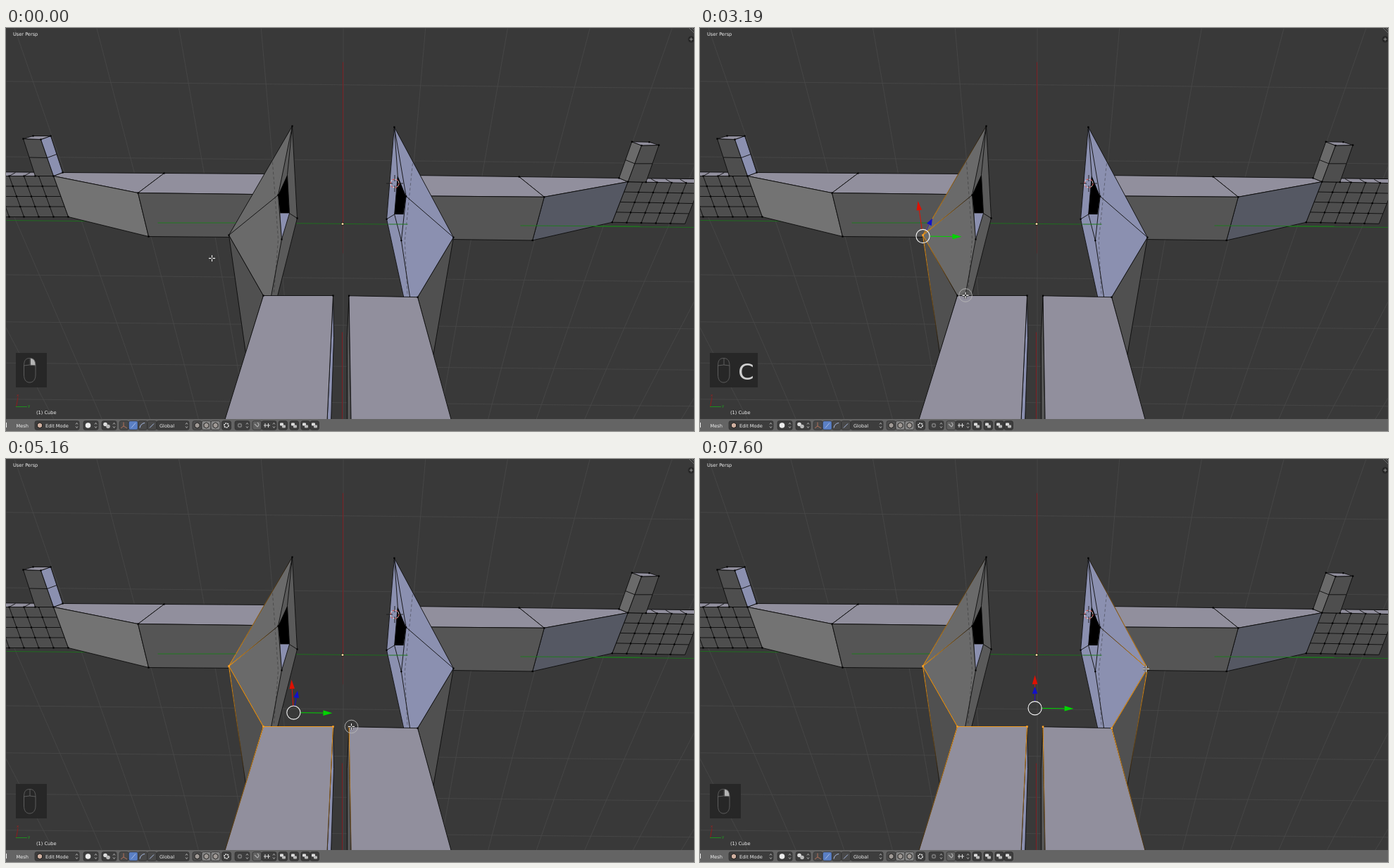
Write an HTML page that moves like this. It is 977 px wide and 573 px high and loops after 8 s.

```html
<!DOCTYPE html>
<html lang="en">
<head>
<meta charset="utf-8">
<title>Mesh editing viewport</title>
<style>
html, body { margin: 0; width: 100%; height: 100%; overflow: hidden; background: #393939; }
svg { display: block; width: 100%; height: 100%; }
text { font-family: "DejaVu Sans", sans-serif; font-size: 6.6px; fill: #f0f0f0; }
</style>
</head>
<body>
<svg id="stage" viewBox="0 0 977 573"></svg>
<script>
const NS = 'http://www.w3.org/2000/svg';
const LOOP = 8000;

function set(el, attrs) {
  for (const k in attrs) el.setAttribute(k, attrs[k]);
}
function add(parent, tag, attrs = {}) {
  const el = document.createElementNS(NS, tag);
  set(el, attrs);
  return parent.appendChild(el);
}
const show = (el, on) => el.setAttribute('visibility', on ? 'visible' : 'hidden');
const path = (parent, d, stroke, width = 1, more = {}) =>
  add(parent, 'path', { d, stroke, 'stroke-width': width, fill: 'none', ...more });
const rect = (parent, x, y, width, height, fill, rx = 0) =>
  add(parent, 'rect', { x, y, width, height, fill, rx });
const ring = (parent, r, stroke, width = 1, more = {}) =>
  add(parent, 'circle', { r, fill: 'none', stroke, 'stroke-width': width, ...more });
const dot = (parent, cx, cy, r, fill) => add(parent, 'circle', { cx, cy, r, fill });
function label(parent, x, y, s, style = '') {
  add(parent, 'text', { x, y, style }).textContent = s;
}
const mix = (a, b, u) => a.map((v, i) => v + (b[i] - v) * u);

const stage = document.getElementById('stage');
// Scene coordinates are pixel centres
const scene = add(stage, 'g', { transform: 'translate(.5 .5)' });

// The left half of the mesh; the right half is its skewed mirror image
const P = {
  wrist: [67, 210], wristLow: [88, 268], wristBack: [80, 205],
  elbow: [187, 234], elbowLow: [202, 296], elbowBack: [224, 206],
  shoulder: [352, 236], shoulderLow: [330, 297], shoulderBack: [372, 207],
  tipA: [24, 157], tipB: [49, 158], tipC: [63, 153], tipD: [38, 153], thumb: [41, 210],
  apex: [406, 139], side: [316, 294], fold: [386, 237], foldLow: [391, 300], foldEnd: [376, 381],
  inner: [413, 270], innerEnd: [385, 381], waist: [340, 462],
  holeTop: [399, 208], holeIn: [402, 263], holeOut: [389, 263],
  hipOut: [365, 380], hipIn: [464, 380], legOut: [300, 590], legIn: [454, 590],
  legMid: [465, 440], legBack: [460, 590]
};
const mirror = ([x, y]) => [955 - 0.985 * x - 0.03 * y, 9.5 - 0.02 * x + y];
const INK = '#0c0c0c', TOP = '#918f9d', BLUE = '#8b90b0', DARK = '#4e4e4e', MID = '#6a6a6a';

function drawFloor() {
  rect(scene, -1, -1, 979, 575, '#393939');
  const far = 1347;
  for (let k = -9; k <= 9; k++) {
    path(scene, `M${478.5 + 116.7 * k} 0L${478.5 + 116.7 * k * (1 - 556 / far)} 556`, '#494949', 0.8);
  }
  for (let k = -2; k <= 4; k++) {
    const y = 278 + 83.4 * k / (1 + 0.078 * k);
    path(scene, `M0 ${y - 5}L977 ${y + 5}`, k ? '#494949' : '#1f6d1f', k ? 0.8 : 1);
  }
  path(scene, 'M478 48V278M477 432V556', '#7c1c21');
  path(scene, 'M478 278V320', '#5c2529', 0.8);
}

function drawHalf(at, paint) {
  const face = (names, fill, stroke = INK) => add(scene, 'polygon', {
    points: names.split(' ').map(n => at(P[n])).join(' '), fill, stroke, 'stroke-width': 0.9, 'stroke-linejoin': 'round'
  });
  const line = (...pts) => path(scene, 'M' + pts.map(at).join('L'), INK, 0.9);
  const edges = names => line(...names.split(' ').map(n => P[n]));
  const mark = p => {
    const [x, y] = at(p);
    rect(scene, x - 1.1, y - 1.1, 2.2, 2.2, '#000');
  };

  // Hand, seen as a wide strip of squares running off the stage
  const quad = (u, v) => mix(mix(P.wrist, [-38, 210], u), mix(P.wristLow, [-17, 268], u), v);
  add(scene, 'polygon', { points: [P.wristBack, [-30, 204], [-30, 211], P.wrist].map(at).join(' '), fill: TOP, stroke: INK });
  add(scene, 'polygon', { points: [quad(0, 0), quad(1, 0), quad(1, 1), quad(0, 1)].map(at).join(' '), fill: DARK, stroke: INK, 'stroke-width': 0.9 });
  for (let i = 1; i < 5; i++) {
    line(quad(i / 5, 0), quad(i / 5, 1));
    line(quad(i / 5, 0), mix(quad(i / 5, 0), [quad(i / 5, 0)[0] + 9, 205], 1));
    if (i < 4) line(quad(0, i / 4), quad(1, i / 4));
    for (let j = 0; j <= 4; j++) mark(quad(i / 5, j / 4));
  }

  face('wrist wristBack elbowBack elbow', TOP);
  face('elbow elbowBack shoulderBack shoulder', TOP);
  face('wrist elbow elbowLow wristLow', paint.forearm);
  face('elbow shoulder shoulderLow elbowLow', '#555');
  face('tipA tipB wrist thumb', DARK);
  face('tipB tipC wristBack wrist', paint.thumb);
  face('tipA tipD tipC tipB', TOP);
  line(mix(P.tipA, P.thumb, 0.5), mix(P.tipB, P.wrist, 0.5), mix(P.tipC, P.wristBack, 0.5));

  face('side hipOut waist', '#505050');
  face('apex inner innerEnd hipOut side', paint.outer, 'none');
  face('apex inner innerEnd foldEnd foldLow fold', paint.inner, 'none');
  face('holeTop fold holeOut holeIn', '#000', 'none');
  face('holeOut holeIn foldLow', BLUE, 'none');
  edges('innerEnd inner apex side hipOut');
  edges('apex fold side');
  edges('apex holeTop holeIn inner');
  edges('fold foldLow foldEnd');
  edges('holeIn foldLow');
  path(scene, 'M' + [[378, 190], [386, 300], [380, 376]].map(at).join('L'), '#222', 0.7,
    { 'stroke-dasharray': '4 3', opacity: 0.6 });

  face('hipIn legMid legBack legIn', paint.leg);
  face('hipOut hipIn legIn legOut', TOP);
  const hidden = /leg|hole|End|waist|shoulder/;
  for (const n in P) if (!hidden.test(n)) mark(P[n]);
}

function drawMarks() {
  path(scene, 'M215 276.5H326M543 278.5H570M730 280.5L900 281.5', '#1f7a1f');
  const cursor3d = add(scene, 'g', { transform: 'translate(551.5 220.5)' });
  ring(cursor3d, 6, '#eee');
  ring(cursor3d, 6, '#c22', 1, { 'stroke-dasharray': '3 3' });
  path(cursor3d, 'M-12 0H-3M3 0H12M0 -12V-3M0 3V12', '#1a1a1a', 0.9);
  dot(scene, 477.5, 278, 2.2, '#111');
  dot(scene, 477.5, 278, 1.5, '#f5d9a0');
}

// Vertices in the order they are picked, left side inward, then outward on the right
const order = ['side', 'hipOut', 'hipIn'];
const picks = [...order.map(n => P[n]), ...order.map(n => mirror(P[n])).reverse()];
const pickTimes = [2430, 3300, 4300, 5060, 5940, 6910];
const ORANGE = '#f09a1c';

function makeSelection() {
  const spokes = { side: ['apex', 'fold', 'waist', 'hipOut'], hipOut: ['legOut'], hipIn: ['legIn'] };
  const links = [[P.hipOut, P.hipIn]];
  for (const a in spokes) {
    for (const b of spokes[a]) links.push([P[a], P[b]], [mirror(P[a]), mirror(P[b])]);
  }
  const same = (p, q) => p[0] === q[0] && p[1] === q[1];
  const rank = p => picks.findIndex(q => same(p, q));
  const edges = links.map(([a, b], i) => {
    const grad = add(scene, 'linearGradient',
      { id: 'g' + i, gradientUnits: 'userSpaceOnUse', x1: a[0], y1: a[1], x2: b[0], y2: b[1] });
    const ends = [a, b].map((p, offset) =>
      ({ rank: rank(p), stop: add(grad, 'stop', { offset, 'stop-color': ORANGE }) }));
    return { ends, line: path(scene, `M${a}L${b}`, `url(#g${i})`, 1.1) };
  });
  const dots = picks.map(([x, y]) => rect(scene, x - 1.3, y - 1.3, 2.6, 2.6, '#ffa52e'));
  return count => {
    const on = rank => rank >= 0 && rank < count;
    for (const { ends, line } of edges) {
      for (const e of ends) set(e.stop, { 'stop-opacity': on(e.rank) ? 1 : 0 });
      show(line, ends.some(e => on(e.rank)));
    }
    dots.forEach((d, i) => show(d, i < count));
  };
}

// Move handle, placed at the centre of the picked vertices
function makeGizmo() {
  const g = add(scene, 'g');
  const axes = ['#e01000', '#00d400', '#1010cc'].map(color =>
    ({ line: path(g, '', color), cone: add(g, 'polygon', { fill: color }) }));
  ring(g, 9.6, '#f4f4f4', 1.1);
  return count => {
    show(g, count > 0);
    if (!count) return;
    const chosen = picks.slice(0, count);
    const [x, y] = [0, 1].map(k => chosen.reduce((sum, p) => sum + p[k], 0) / count + k * 1.5);
    set(g, { transform: `translate(${x} ${y})` });
    const lean = 475 - x, rise = 354 - y;
    const tips = [[-lean * 0.044, -47 - rise * 0.05], [55, 0.7], [lean * 0.085, -30.5 + rise * 0.09]];
    axes.forEach(({ line, cone }, i) => {
      const [tx, ty] = tips[i], d = Math.hypot(tx, ty);
      const ux = tx / d, uy = ty / d, len = i < 2 ? 13 : 10, w = 3.8;
      const bx = tx - ux * len, by = ty - uy * len;
      set(line, { d: `M${ux * 9.6} ${uy * 9.6}L${bx} ${by}` });
      set(cone, { points: `${tx},${ty} ${bx - uy * w},${by + ux * w} ${bx + uy * w},${by - ux * w}` });
    });
  };
}

function makeKeys() {
  const box = rect(stage, 14, 462, 44, 49, '#272727');
  const right = path(stage, 'M35 469.5Q42 470 42 479.5H35Z', 'none', 0, { fill: '#b4b4b4' });
  path(stage, 'M33.5 469.5C27 469.5 25.5 474 25.5 481V493C25.5 500 28.5 504 33.5 504S42 500 42 493V481C42 474 40 469.5 33.5 469.5ZM25.5 480Q33.5 478 42 480M34 469.5V479', '#626262', 0.9);
  const key = add(stage, 'g');
  label(key, 54.2, 499.8, 'C', 'font-size:32px;fill:#cfcfcf');
  return t => {
    const typed = t >= 120 && t < 3400;
    set(box, { width: typed ? 68 : 44 });
    show(key, typed);
    show(right, t < 340 || t >= 7600);
  };
}

// Mouse strokes: start, end, destination; each eases out in coarse steps
const strokes = [
  [340, 1130, 312, 302], [1540, 2210, 318.5, 294], [2340, 3190, 376.5, 379.5],
  [3300, 4050, 475, 383], [4170, 4530, 465, 382.5], [4640, 5160, 490, 380],
  [5260, 5820, 586, 381], [5940, 6460, 643, 290], [6580, 6580, 627, 294], [6910, 7150, 633, 298]
];
function cursorAt(t) {
  let pos = [292, 327];
  for (const [t0, t1, ...to] of strokes) {
    if (t < t0) break;
    const n = Math.round((t1 - t0) / 110) + 1;
    const u = t >= t1 ? 1 : (Math.floor((t - t0) / 110) + 1) / n;
    pos = mix(pos, to, 1 - (1 - Math.min(u, 1)) ** 2);
  }
  return pos;
}
function makeCursor() {
  const g = add(scene, 'g');
  const brush = ring(g, 9.3, '#b8b8b8', 0.9);
  const cross = 'M-4.5 0H-1M1 0H4.5M0 -4.5V-1M0 1V4.5';
  path(g, cross, '#111', 2.8);
  path(g, cross, '#fff', 1.3);
  return t => {
    set(g, { transform: `translate(${cursorAt(t)})` });
    show(brush, t >= 120 && t < 7440);
  };
}

function drawInterface() {
  label(stage, 10, 11, 'User Persp');
  label(stage, 43, 549, '(1) Cube');
  path(stage, 'M14.5 539L17 525', '#8e1c1c');
  path(stage, 'M14 538.5H30', '#1c8e1c');
  label(stage, 15, 524, 'x', 'font-size:5.5px;fill:#a02020');
  label(stage, 31, 539, 'y', 'font-size:5.5px;fill:#20a020');
  path(stage, 'M970 0L977 7M974 0L977 3', '#777', 0.8);
  dot(stage, 973, 16, 4.5, '#262626');
  path(stage, 'M970.5 16H975.5M973 13.5V18.5', '#999', 0.9);

  rect(stage, 0, 556, 977, 17, '#646464');
  rect(stage, 0, 561, 1, 7, '#eee');
  label(stage, 14.5, 567.5, 'Mesh');
  const button = (x, w, fill = '#3d3d3d') =>
    set(rect(stage, x, 558.7, w, 12.6, fill, 2.5), { stroke: '#2b2b2b', 'stroke-width': 0.7 });
  const menu = (x, w) => {
    button(x, w);
    path(stage, `M${x + w - 5} 563.5l1.5 -2l1.5 2m0 3l-1.5 2l-1.5 -2`, '#ccc', 0.8);
  };
  const cube = (x, fill) =>
    path(stage, `M${x - 3.5} 563l3.5 -2l3.5 2v4l-3.5 2l-3.5 -2Z`, INK, 0.8, { fill });

  menu(41, 63);
  cube(48, '#d0b0a0');
  label(stage, 56, 567.5, 'Edit Mode');
  menu(110, 21);
  dot(stage, 116.5, 565, 3.8, '#eee');
  menu(136, 21);
  dot(stage, 141, 563.5, 2.8, '#ddd');
  dot(stage, 145, 566.5, 2.8, '#bbb');

  for (let i = 0; i < 4; i++) button(161 + 13.2 * i, 13.2, i === 1 ? '#5a7fc4' : '#484848');
  path(stage, 'M167 566V560.5M167 566l-4 3M167 566l5 3', '#b0705a');
  path(stage, 'M178 568.5l6 -7M190 568.5q1 -6 7 -7M204 568.5l6 -6', '#a9bce6');
  menu(214, 46);
  label(stage, 218, 567.5, 'Global');

  for (let i = 0; i < 3; i++) {
    button(265 + 13 * i, 13, i ? '#858585' : '#4e4e4e');
    cube(271.5 + 13 * i, '#a09a96');
  }
  button(306.5, 13);
  ring(stage, 3, '#eee', 1.6, { cx: 313, cy: 565, 'stroke-dasharray': '2 1' });
  menu(325, 21);
  ring(stage, 2.4, '#777', 1.6, { cx: 332, cy: 565 });
  button(350, 13, '#606060');
  path(stage, 'M353 563l4 4q4 -3 0 -6', '#aaa', 1.3);
  menu(363, 21);
  path(stage, 'M366 565h9M368 562v6M372.5 562v6', '#ddd');
  for (const x of [387, 403, 419, 432]) {
    button(x, 12.5);
    rect(stage, x + 2, 561.5, 5, 4, '#ddd', 1);
    rect(stage, x + 5, 564.5, 5, 4, '#bbb', 1);
  }
}

drawFloor();
drawHalf(p => p, { forearm: '#737373', thumb: BLUE, outer: MID, inner: '#5a5a5a', leg: BLUE });
drawHalf(mirror, { forearm: '#555863', thumb: MID, outer: BLUE, inner: BLUE, leg: '#555' });
const setSelection = makeSelection();
drawMarks();
const setGizmo = makeGizmo();
const setKeys = makeKeys();
const setCursor = makeCursor();
drawInterface();

function render(t) {
  const count = pickTimes.filter(p => t >= p).length;
  setSelection(count);
  setGizmo(count);
  setKeys(t);
  setCursor(t);
}

const begin = performance.now();
function tick() {
  render((performance.now() - begin) % LOOP);
  requestAnimationFrame(tick);
}
tick();
</script>
</body>
</html>
```
